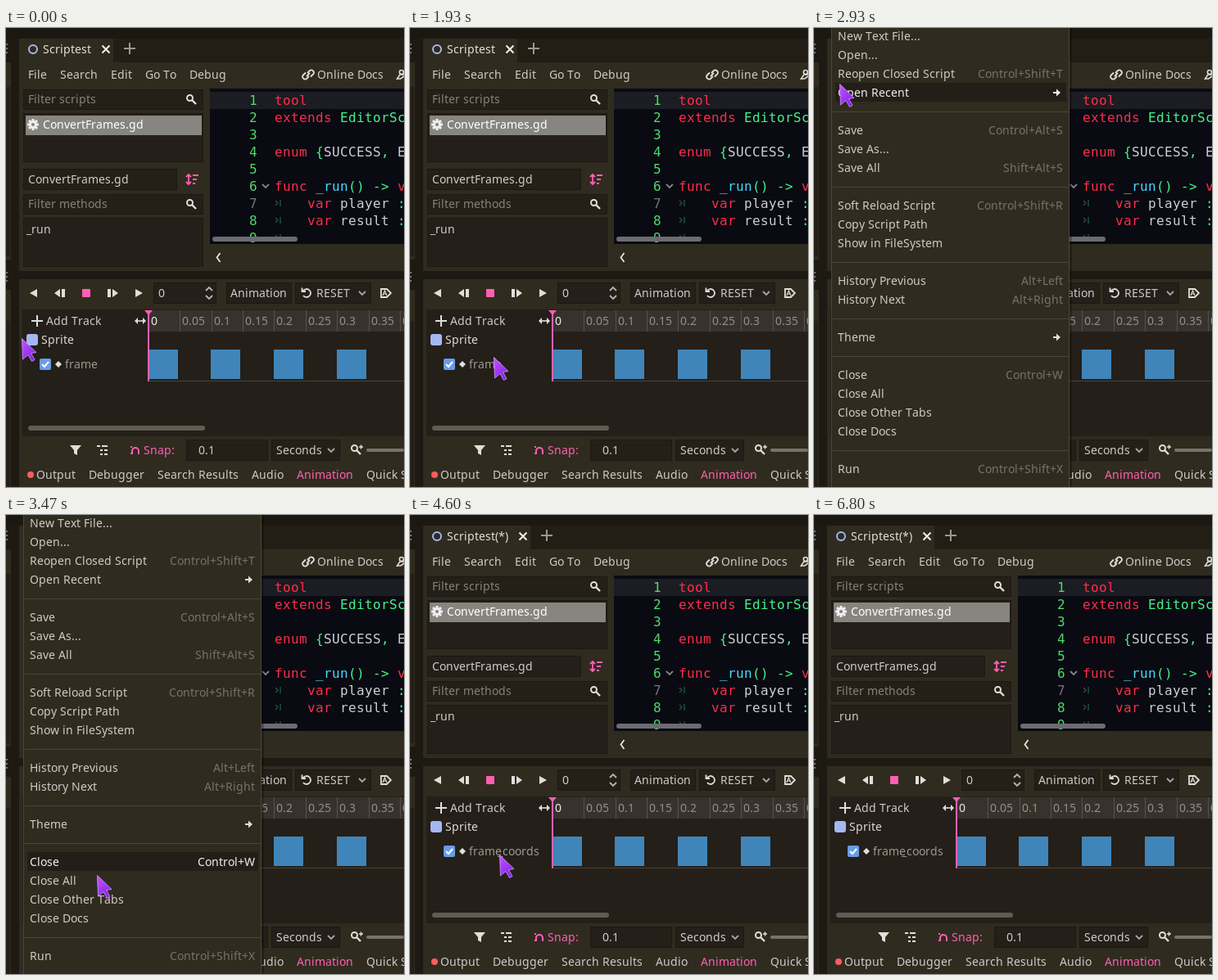
Recreate the animation shown at these times as an HTML page. Size 486 by 561 pixels, loop 7.67 s.

```html
<!DOCTYPE html>
<html lang="en">
<head>
<meta charset="utf-8">
<title>Script editor</title>
<style>
html, body { margin: 0; width: 486px; height: 561px; overflow: hidden; background: #1d1a13; }
svg { display: block; }
text { font: 14px "Noto Sans", sans-serif; white-space: pre; }
text.code { font: 16px "DejaVu Sans Mono", monospace; }
.item rect { visibility: hidden; }
.item.hot rect { visibility: inherit; }
.item.hot text, .item.hot path { fill: #f0eeec; }
</style>
</head>
<body>
<svg id="stage" width="486" height="561" viewBox="0 0 486 561"></svg>
<script>
const TEXT = '#cecbc7', DIM = '#86827b', PINK = '#ff5fb3', PANEL = '#302b1f', WELL = '#241f18', EDGE = '#1b1812';
const pen = document.createElement('canvas').getContext('2d');

// Each glyph advances by whole pixels.
function text(x, y, s, fill = TEXT, { code = false, end = false } = {}) {
  pen.font = code ? '16px "DejaVu Sans Mono", monospace' : '14px "Noto Sans", sans-serif';
  const steps = [...s].map(c => Math.round(pen.measureText(c).width));
  if (end) x -= steps.reduce((a, b) => a + b, 0);
  const xs = steps.map(w => (x += w) - w);
  return `<text x="${xs.join(' ')}" y="${y}" fill="${fill}"${code ? ' class="code"' : ''}>${s}</text>`;
}
const rect = (x, y, w, h, fill, r = 0) =>
  `<rect x="${x}" y="${y}" width="${w}" height="${h}" fill="${fill}" rx="${r}"/>`;
const box = (x, y, w, h) =>
  `<rect x="${x + .5}" y="${y + .5}" width="${w - 1}" height="${h - 1}" fill="${WELL}" stroke="${EDGE}"/>`;
const fill = (d, c = '#e0deda') => `<path d="${d}" fill="${c}"/>`;
const line = (d, c = '#e0deda', w = 2) => `<path d="${d}" fill="none" stroke="${c}" stroke-width="${w}"/>`;
const ring = (x, y, r, c = '#e0deda', w = 2) =>
  `<circle cx="${x}" cy="${y}" r="${r}" fill="none" stroke="${c}" stroke-width="${w}"/>`;
const lens = (x, y) => ring(x - 1.5, y - 1.5, 3.5) + line(`M${x + 1} ${y + 1}l5 5`, '#e0deda', 2.4);
const chevron = (x, y, c = '#aaa7a2') => line(`M${x - 4} ${y - 2}l4 4 4-4`, c, 1.8);
const group = (id, body) => `<g id="${id}">${body}</g>`;

function scenePanel() {
  const gear = Array.from({ length: 8 }, (_, i) =>
    `<rect x="31.5" y="111" width="3" height="4" fill="#eee" transform="rotate(${i * 45} 33 118)"/>`).join('');
  return rect(0, 0, 486, 13, '#1b1811') + rect(16, 13, 470, 29, '#221e16') + rect(16, 42, 470, 255, PANEL)
    + rect(0, 42, 6, 241, PANEL) + rect(0, 72, 5, 207, WELL) + rect(0, 320, 6, 241, PANEL) + rect(0, 358, 5, 203, WELL)
    + [19, 24, 29, 298, 303, 308].map(y => rect(0, y, 2, 2, '#77736b')).join('')
    + `<rect id="tab" x="16" y="13" height="29" fill="${PANEL}"/>`
    + ring(33, 26, 5, '#a5b7f3') + text(45, 31, 'Scriptest', '#e2dfdb')
    + group('star', text(104, 31, '(*)', '#e2dfdb'))
    + group('tabEnd', line('M117.500 21.500l9 9m0-9l-9 9', '#f0eeea', 2) + line('M144 25h14M151 18v14', '#9a978f', 2))
    + [[27, 'File'], [66, 'Search'], [128, 'Edit'], [170, 'Go To'], [224, 'Debug'], [380, 'Online Docs']]
      .map(([x, s]) => text(x, 62, s)).join('')
    + line('M368 55l3-3q2-1.500 4 0.500t0 4l-3 3M370 59l-3 3q-2 1.500-4-0.500t0-4l3-3M367 59l4-4', '#e0deda', 1.8)
    + ring(483, 54, 2.5, '#e0deda', 1.6) + line('M477 63l4-6h5M478 62h4l4-3', '#e0deda', 1.6)
    + box(21, 75, 220, 25) + text(27, 92, 'Filter scripts', DIM) + lens(226, 87)
    + box(21, 104, 220, 60) + rect(24, 107, 215, 24, '#878580') + gear + ring(33, 118, 3.6, '#eee', 3)
    + text(45, 123, 'ConvertFrames.gd', '#fff')
    + box(21, 172, 188, 26) + text(27, 190, 'ConvertFrames.gd')
    + line('M223 179v11M220 188l3 3 3-3M220 182l3-3 3 3M228 180h7M228 185h5M228 190h3', PINK, 1.8)
    + box(21, 203, 220, 25) + text(27, 220, 'Filter methods', DIM) + lens(226, 215)
    + box(21, 232, 220, 60) + text(25, 251, '_run')
    + line('M261.500 275l-4 5.500 4 5.500', '#e8e6e2', 1.8);
}

function codePanel() {
  const red = '#ff2d48', green = '#42f586', cyan = '#45dcff', white = '#cdcfd6';
  const lines = [
    [['tool', red]],
    [['extends ', red], ['EditorScript', green]],
    [],
    [['enum ', red], ['{', green], ['SUCCESS', white], [',', green], [' E', white]],
    [],
    [['func ', red], ['_run', cyan], ['() ->', green], [' v', red]],
    [['    var', red], [' player ', white], [':', green]],
    [['    var', red], [' result ', white], [':', green]],
    []
  ];
  const rows = lines.map((parts, i) => {
    let x = 328;
    const y = 94 + 21 * i;
    return text(307, y, String(i + 1), i === 6 ? '#73747b' : '#4ddc69', { code: true, end: true })
      + parts.map(([s, c]) => {
        const out = text(x, y, s, c, { code: true });
        x += s.length * 10;
        return out;
      }).join('')
      + (i > 5 ? line(`M329 ${y - 9}l3 3-3 3M335 ${y - 10}v8`, '#1e5034', 1.5) : '');
  }).join('');
  return `<svg x="249" y="74" width="237" height="190" viewBox="249 74 237 190">${rect(249, 74, 237, 190, '#0a0a12')
    + rect(249, 78, 237, 21, '#1c1c23') + rows + chevron(317, 193, '#83848b')
    + rect(252, 255, 104, 6, '#6b6b71', 3)}</svg>`;
}

function animationPanel() {
  const ruler = Array.from({ length: 9 }, (_, i) => {
    const x = Math.round(173.7 + 38.4 * i);
    return rect(x, 345, 1, 26, '#57534c') + text(x + 3, 363, String(i * 5 / 100), i ? '#918e88' : '#eceae6');
  }).join('');
  const tabs = [[37, 'Output'], [101, 'Debugger'], [185, 'Search Results'], [300, 'Audio'], [355, 'Animation', PINK], [440, 'Quick S']];
  return rect(16, 307, 470, 254, PANEL)
    + fill('M38 319v10l-9-5zM66 319v10l-7-5zM68 319h4v10h-4zM124 319h4v10h-4zM130 319v10l7-5zM158 319v10l9-5z')
    + rect(93, 319, 10, 10, PINK, 1)
    + box(180, 311, 77, 26) + text(186, 329, '0') + line('M244 321l4-4 4 4M244 327l4 4 4-4', '#b8b5b0', 1.8)
    + box(269, 311, 80, 26) + text(274, 329, 'Animation')
    + box(353, 311, 93, 26) + line('M363 321a5 5 0 1 1 0 6M361.500 317.500v4.500h4.500', '#e0deda', 1.8)
    + text(379, 329, 'RESET') + chevron(435, 324)
    + line('M458 319h7l5 5-5 5h-7z', '#e0deda', 1.8) + line('M460 327l2.500-6 2.500 6M461 325h3', '#e0deda', 1.2)
    + rect(20, 344, 466, 155, WELL) + rect(174, 345, 312, 26, '#37332c') + ruler
    + line('M31 358h14M38 351v14') + text(49, 363, 'Add Track')
    + line('M159 358h10', '#e0deda', 1.6) + fill('M161 354v8l-4-4zM167 354v8l4-4z')
    + rect(25, 374, 14, 14, '#a5b7f3', 3) + text(43, 386, 'Sprite', '#dcd9d5')
    + rect(174, 431, 312, 1, '#49453d')
    + rect(41, 404, 14, 14, '#699ce8', 2) + line('M44 411l3 3 5-6', '#fff')
    + fill('M64 407l4 4-4 4-4-4z') + text(72, 416, 'frame', '#9c9993') + group('coords', text(107, 416, '_coords', '#9c9993'))
    + [174, 250, 327, 404].map(x => rect(x, 393, 36, 36, '#4085ba')).join('')
    + rect(173, 345, 2, 87, PINK) + fill('M169 345h10l-5 6z', PINK)
    + '<rect id="bar" x="27" y="486" width="216" height="6" rx="3"/>'
    + fill('M78 510h14l-5 6v6l-4-2v-4z') + line('M111 511h4M115 516h3M115 521h3M117 511h7M120 516h4M120 521h4', '#e0deda', 1.8)
    + line('M154 521v-4a4 4 0 0 1 8 0v4', PINK, 2) + rect(152, 511, 2, 2, PINK) + rect(152, 519, 2, 2, PINK)
    + text(168, 521, 'Snap:', PINK)
    + box(220, 503, 100, 26) + text(235, 521, '0.1') + box(324, 503, 84, 26) + text(330, 521, 'Seconds') + chevron(397, 516)
    + lens(427, 515) + line('M431 512h5M433.500 509.500v5', '#e0deda', 1.5)
    + rect(440, 514, 46, 4, '#77736b', 2)
    + '<circle cx="30" cy="546" r="4" fill="#ff5b5b"/>'
    + tabs.map(([x, s, c]) => text(x, 551, s, c)).join('');
}

function fileMenu() {
  const labels = ['New Text File...', 'Open...', 'Reopen Closed Script|Control+Shift+T', 'Open Recent|>', '',
    'Save|Control+Alt+S', 'Save As...', 'Save All|Shift+Alt+S', '',
    'Soft Reload Script|Control+Shift+R', 'Copy Script Path', 'Show in FileSystem', '',
    'History Previous|Alt+Left', 'History Next|Alt+Right', '', 'Theme|>', '',
    'Close|Control+W', 'Close All', 'Close Other Tabs', 'Close Docs', '', 'Run|Control+Shift+X'];
  const items = labels.map((label, i) => {
    const y = 10 + 23 * i, [name, key] = label.split('|');
    if (!name) return `<g>${rect(23, y, 288, 1, '#4a463b')}</g>`;
    const side = key === '>' ? fill(`M292 ${y - 1}h4v-3.500l5 4.500-5 4.500v-3.500h-4z`) : key ? text(304, y + 5, key, '#77736a', { end: true }) : '';
    return `<g class="item">${rect(26, y - 12, 282, 23, '#231f18') + text(29, y + 5, name) + side}</g>`;
  }).join('');
  return rect(311, 0, 4, 561, 'rgba(0,0,0,.25)') + rect(21, 0, 291, 561, '#4b473d') + rect(22, 0, 289, 561, PANEL)
    + group('items', items);
}

const tip = (id, x, y, w, s) => group(id, rect(x - 1, y - 1, w + 3, 31, 'rgba(0,0,0,.3)', 1)
  + rect(x, y, w, 28, '#e7e6e5') + text(x + 5, y + 19, s, '#3d3a36'));

document.getElementById('stage').innerHTML =
  `<linearGradient id="violet" x1="0" y1="0" x2=".6" y2="1"><stop stop-color="#c455ff"/><stop offset="1" stop-color="#8324ee"/></linearGradient>`
  + scenePanel() + codePanel() + animationPanel() + group('menu', fileMenu())
  + tip('tipA', 112, 419, 94, 'Sprite:frame') + tip('tipB', 121, 415, 145, 'Sprite:frame_coords')
  + `<path id="cursor" d="M.5 .5L18 17.500L11.500 18.500L16 26.500L12.500 28.500L8 20.500L1.500 26z" fill="url(#violet)" stroke="#d69aff" stroke-width=".8"/>`;

// Pointer path: tick, x, y
const path = [
  [0, 19, 379], [1, 28, 380], [3, 72, 396], [5, 98, 407], [6, 101, 409], [28, 101, 409],
  [29, 102, 402], [31, 106, 350], [33, 113, 235], [35, 117, 145], [36, 115, 112], [37, 92, 92], [39, 31, 68],
  [44, 31, 68], [45, 31, 67], [48, 31, 67], [49, 36, 90], [51, 98, 395], [52, 111, 440], [54, 109, 505], [56, 95, 530],
  [58, 95, 530], [59, 94, 532], [63, 94, 532], [64, 95, 526], [66, 100, 486], [69, 109, 415], [71, 110, 409],
  [73, 110, 409], [74, 110, 405], [94, 110, 405], [95, 108, 413], [98, 98, 486], [102, 92, 575], [115, 92, 575]
];
function pointer(k) {
  const i = Math.max(1, path.findIndex(p => p[0] >= k));
  const [a, ax, ay] = path[i - 1], [b, bx, by] = path[i], f = (k - a) / (b - a);
  return [Math.round(ax + (bx - ax) * f), Math.round(ay + (by - ay) * f)];
}

const $ = id => document.getElementById(id);
const show = (id, on) => $(id).setAttribute('visibility', on ? 'visible' : 'hidden');

function draw() {
  // The screen refreshes 15 times a second.
  const k = Math.min(114, Math.floor(performance.now() % 7670 * .015 + .06));
  const [x, y] = pointer(k), renamed = k >= 62;
  $('cursor').setAttribute('transform', `translate(${x} ${y})`);
  show('menu', k >= 42 && k < 62);
  show('tipA', k >= 14 && k < 29);
  show('tipB', k >= 82 && k < 96);
  show('star', renamed);
  show('coords', renamed);
  $('tab').setAttribute('width', renamed ? 131 : 115);
  $('tabEnd').setAttribute('transform', `translate(${renamed ? 16 : 0} 0)`);
  $('bar').setAttribute('fill', renamed && y > 482 && y < 495 ? '#a5a29c' : '#605c54');
  const row = k > 42 ? Math.floor((pointer(k - .3)[1] + 1.5) / 23) : -1;
  [...$('items').children].forEach((item, i) => item.classList.toggle('hot', i === row));
  requestAnimationFrame(draw);
}
draw();
</script>
</body>
</html>
```
